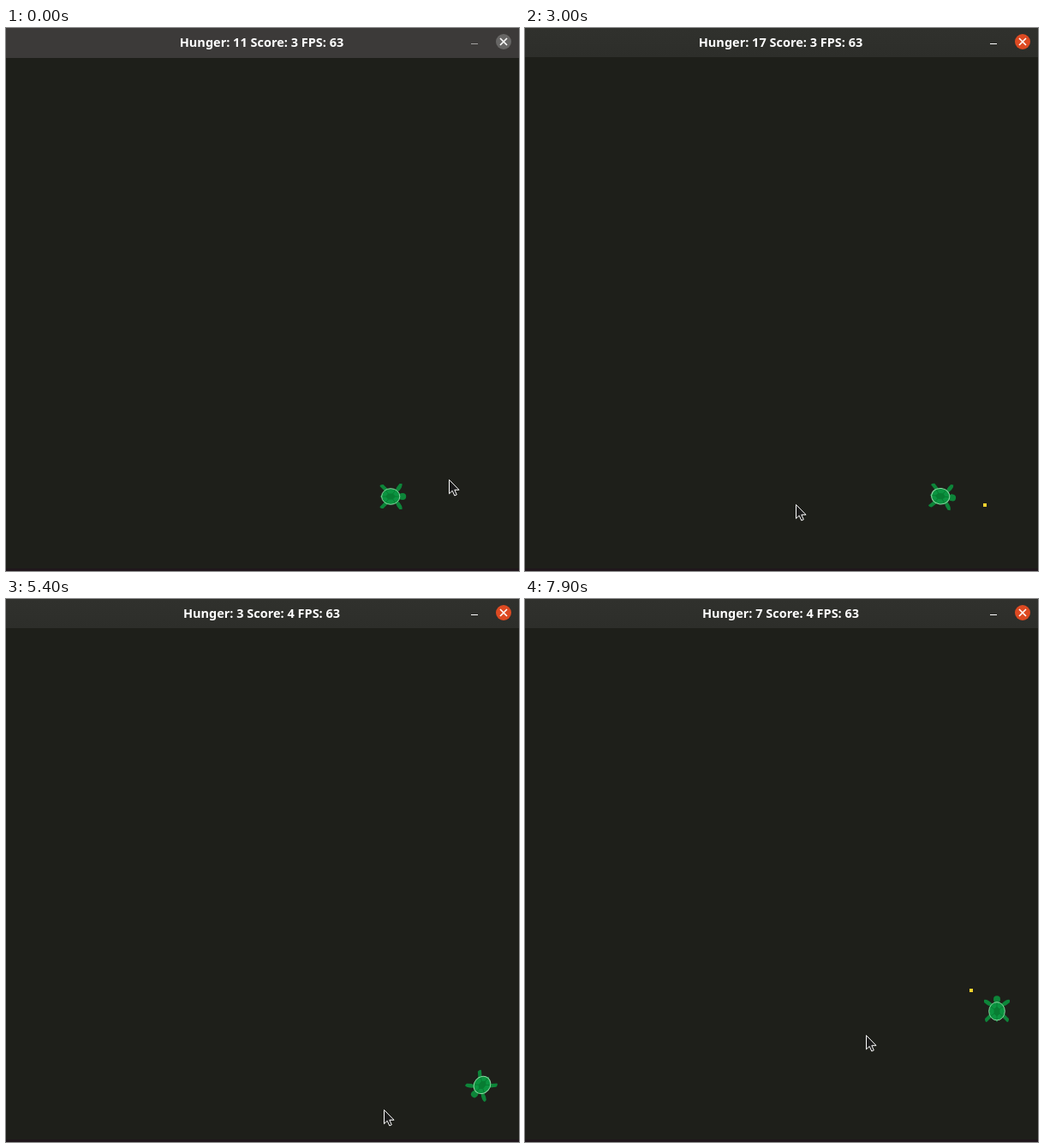
Write an HTML page that moves like this. It is 599 px wide and 634 px high and loops after 8 s.

```html
<!DOCTYPE html>
<html lang="en">
<head>
<meta charset="utf-8">
<title>Turtle game</title>
<style>
  html, body { margin: 0; width: 100%; height: 100%; overflow: hidden; background: #1e1f1a; }
  svg { display: block; }
  text { font: bold 14.5px "Noto Sans", "Open Sans", sans-serif; fill: #fff; text-anchor: middle; }
</style>
</head>
<body>
<svg width="599" height="634" viewBox="0 0 599 634">
  <defs>
    <linearGradient id="active" x2="0" y2="1">
      <stop stop-color="#30312d"/><stop offset="1" stop-color="#2d2e2a"/>
    </linearGradient>
    <path id="flippers" d="M3-7Q5-12 8-15L11-15Q12-11 6-5ZM-8-5L-15-12Q-15-14-11-14L-6-9Z"/>
  </defs>
  <rect width="599" height="634" fill="#1e1f1a"/>
  <rect y="631" width="599" height="3" fill="#20171c"/>
  <rect id="bar" width="599"/>
  <text id="title" x="298.5" y="22"></text>
  <path id="dash" d="M543 18.5h8"/>
  <circle id="close" cx="581" cy="16" r="9"/>
  <path d="M577 12l8 8m0-8l-8 8" stroke="#fff" stroke-width="1.6"/>

  <rect id="food" width="4" height="4" fill="#f2d22e"/>

  <g id="turtle">
    <g fill="#0d8539">
      <use href="#flippers"/>
      <use href="#flippers" transform="scale(1 -1)"/>
      <path d="M-12-2L-15 0L-12 2Z"/>
      <ellipse cx="11.5" rx="4.2" ry="4"/>
    </g>
    <ellipse cx="-2.3" rx="10.6" ry="9.3" fill="#0b9440" stroke="#8ad6a0"/>
    <path d="M-5-3H0L3 0L0 3H-5L-8 0ZM-5-3L-8-7M0-3L3-7M3 0H7M0 3L3 7M-5 3L-8 7M-8 0H-12"
      fill="#087c32" stroke="#087c32"/>
  </g>

  <path id="cursor" d="M.5.5V16.8L4.2 13.3L6.8 19L9.3 17.9L6.8 12.3H12Z" fill="#1b1b1b" stroke="#fff"/>
</svg>
<script>
const LOOP = 8000, STEP = 100;
const FOCUS = 300, EATEN = 3700;
const el = id => document.getElementById(id);

// Where the pointer rests: arrival, departure, x, y
const rests = [
  [0, 300, 517, 527], [600, 850, 535, 555], [1100, 1100, 463, 548], [1800, 3600, 316, 556],
  [4100, 4500, 270, 398], [5400, 5900, 441, 596], [6700, 7200, 518, 456], [7700, LOOP, 398, 509]
];

// Progress from 0 to 1 between two times
const ramp = (t, from, to) => Math.min(1, Math.max(0, (t - from) / (to - from)));

function cursorAt(t) {
  const i = rests.findLastIndex(([arrival]) => arrival <= t);
  const [, leave, x, y] = rests[i];
  const [arrive, , nextX, nextY] = rests[i + 1] || rests[i];
  const u = t > leave ? ramp(t, leave, arrive) : 0;
  const ease = u * u * (3 - 2 * u);
  return [x + (nextX - x) * ease, y + (nextY - y) * ease].map(Math.round);
}

function turtleAt(t) {
  const turn = ramp(t, 5000, 6800);
  return {
    x: 451.5 + 36 * ramp(t, 500, 900) + 68 * ramp(t, 3100, 3800) - 4.5 * turn,
    y: 547 + 24 * ramp(t, 4800, 5100) - 8 * turn - 84 * ramp(t, 6920, 7900),
    heading: 67 * ramp(t, 900, 1100) - 60 * ramp(t, 1400, 2600)
      + 83 * ramp(t, 3750, 4800) + 180 * turn
  };
}

// Hunger grows faster while the turtle swims, and eating resets it
function hungerAt(t) {
  return Math.floor(t < EATEN
    ? 11 + 4 * ramp(t, FOCUS, 1000) + 4 * ramp(t, 1500, EATEN)
    : 5.8 * ramp(t, EATEN, 6900) + 2 * ramp(t, 6900, 7200));
}

function foodAt(t) {
  if (t >= 800 && t < EATEN) return [535, 555];
  if (t >= 7000) return [519, 455];
}

function set(id, attrs) {
  for (const name in attrs) el(id).setAttribute(name, attrs[name]);
}

function draw(t) {
  const focused = t >= FOCUS;
  set("bar", { fill: focused ? "url(#active)" : "#3c3a39", height: focused ? 34 : 35 });
  set("close", { fill: focused ? "#dd4a22" : "#676665" });
  set("dash", { stroke: focused ? "#fff" : "#a3a2a1" });

  const hunger = hungerAt(t), fps = hunger % 7 === 1 ? 62 : 63;
  el("title").textContent = `Hunger: ${hunger} Score: ${t < EATEN ? 3 : 4} FPS: ${fps}`;

  const food = foodAt(t);
  set("food", { visibility: food ? "visible" : "hidden", transform: `translate(${food || "0"})` });

  const { x, y, heading } = turtleAt(t);
  set("turtle", { transform: `translate(${x} ${y}) rotate(${heading})` });
  set("cursor", { transform: `translate(${cursorAt(t)})` });
}

const start = performance.now();
function tick() {
  const t = (performance.now() - start) % LOOP;
  draw(Math.floor(t / STEP) * STEP);
  requestAnimationFrame(tick);
}
tick();
</script>
</body>
</html>
```
